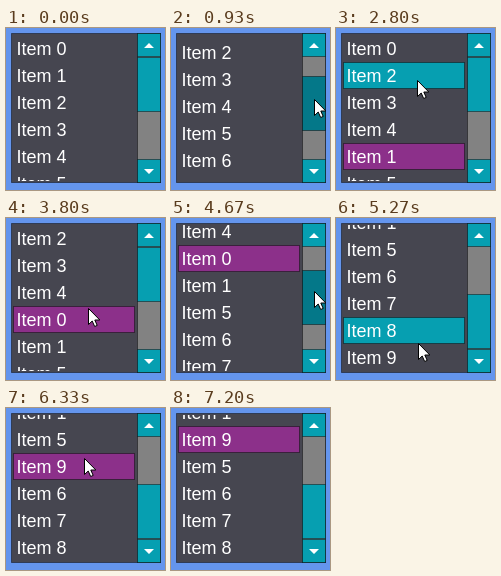
Animation of 159 by 162 pixels, one loop 8.07 s. Source, as an HTML page:

```html
<!DOCTYPE html>
<html lang="en">
<head>
<meta charset="utf-8">
<title>Reorderable list</title>
<style>
  html, body { margin: 0; width: 100%; height: 100%; overflow: hidden; background: #6495ed; }
  svg { display: block; width: 100%; height: 100%; }
  text { font: 18px "Liberation Sans", Arial, sans-serif; fill: #fff; }
  .box { stroke: #000; stroke-opacity: .45; }
</style>
</head>
<body>
<svg viewBox="0 0 159 162">
  <clipPath id="view"><rect x="7" y="7" width="122" height="146"/></clipPath>
  <rect class="box" x="5.5" y="5.5" width="149" height="149" fill="#464650"/>
  <g id="list" clip-path="url(#view)"></g>
  <rect class="box" x="131.5" y="5.5" width="23" height="149" fill="#828282"/>
  <rect id="thumb" class="box" x="131.5" y="29.5" width="23" height="54"/>
  <rect class="box" x="131.5" y="5.5" width="23" height="23" fill="#069fb1"/>
  <rect class="box" x="131.5" y="131.5" width="23" height="23" fill="#069fb1"/>
  <path d="M138 20h10l-5-5zM138 141h10l-5 5z" fill="#fff"/>
  <path id="cursor" d="M.5 .5V16.5L4.2 13 6.7 18.5 9.2 17.4 6.8 12H11.8Z" fill="#fff" stroke="#000"/>
</svg>
<script>
const LOOP = 8070, TICK = 200 / 3;
const ROW = 27, TOP = 7, VIEW = 146, COUNT = 10;
const MAX_SCROLL = COUNT * ROW - VIEW;
const THUMB_TOP = 29, THUMB_SIZE = 55, TRAVEL = 47;
const PRIMARY = '#069fb1', LIGHT = '#4ab4c1', DARK = '#047889', ACCENT = '#8c308a';

// Pointer path: time, x, y
const path = [
  [0, 172, 62], [70, 154, 58], [200, 143, 52], [330, 143, 52],
  [670, 143, 92], [800, 143, 92], [1070, 143, 48], [1330, 67, 46],
  [1400, 67, 46], [1870, 67, 93], [2270, 68, 129], [2800, 81, 52],
  [3130, 82, 18], [3200, 82, 18], [3800, 82, 90], [4000, 82, 90],
  [4400, 143, 50], [4470, 143, 50], [4930, 143, 102], [5000, 143, 102],
  [5270, 82, 125], [5530, 80, 135], [5670, 80, 134], [5870, 79, 106],
  [6330, 78, 50], [6530, 78, 31], [6870, 78, 31], [7200, 92, 168]
];
const grabs = [{ from: 270, to: 1070 }, { from: 4470, to: 4950 }];
const drags = [
  { from: 1470, to: 2330, item: 1 },
  { from: 3270, to: 3870, item: 0 },
  { from: 5600, to: 6600, item: 9 }
];

const $ = id => document.getElementById(id);
const clamp = (v, lo, hi) => Math.min(hi, Math.max(lo, v));
const during = (t, span) => t >= span.from && t < span.to;

function make(tag, attrs, parent) {
  const el = document.createElementNS('http://www.w3.org/2000/svg', tag);
  for (const k in attrs) el.setAttribute(k, attrs[k]);
  return parent.appendChild(el);
}

const rows = Array.from({ length: COUNT }, (_, i) => {
  const g = make('g', {}, $('list'));
  const bar = make('rect', { class: 'box', x: 7.5, y: .5, width: 121, height: ROW - 1 }, g);
  make('text', { x: 10.5, y: 20 }, g).textContent = 'Item ' + i;
  return { g, bar };
});

function pointer(t) {
  const i = path.findIndex(p => p[0] > t);
  if (i < 0) return path[path.length - 1].slice(1);
  const [a, ax, ay] = path[i - 1], [b, bx, by] = path[i];
  const k = (t - a) / (b - a);
  return [Math.round(ax + (bx - ax) * k), Math.round(ay + (by - ay) * k)];
}

function scrollAt(t) {
  let offset = 0;
  for (const g of grabs) {
    if (t < g.from) break;
    const dy = pointer(Math.min(t, g.to))[1] - pointer(g.from)[1];
    offset = clamp(offset + dy / TRAVEL * MAX_SCROLL, 0, MAX_SCROLL);
  }
  return Math.round(offset);
}

const rowAt = (y, scroll) => clamp(Math.floor((y - TOP + scroll) / ROW), 0, COUNT - 1);

function orderAt(t) {
  const order = rows.map((_, i) => i);
  for (const d of drags) {
    if (t < d.from) break;
    const end = Math.min(t, d.to - 60);
    order.splice(order.indexOf(d.item), 1);
    order.splice(rowAt(pointer(end)[1], scrollAt(end)), 0, d.item);
  }
  return order;
}

function draw(t) {
  const [x, y] = pointer(t);
  const scroll = scrollAt(t);
  const dragging = drags.some(d => during(t, d));
  const grabbing = grabs.some(g => during(t, g));
  const last = drags.filter(d => t >= d.from).pop();
  const inList = x >= 7 && x < 129 && y >= TOP && y < TOP + VIEW;
  const hover = inList && !dragging && !grabbing ? rowAt(y, scroll) : -1;

  orderAt(t).forEach((item, i) => {
    const { g, bar } = rows[item];
    const selected = last && last.item === item;
    g.setAttribute('transform', `translate(0 ${TOP + i * ROW - scroll})`);
    bar.setAttribute('fill', selected ? ACCENT : PRIMARY);
    bar.setAttribute('visibility', selected || i === hover ? 'visible' : 'hidden');
  });

  const top = THUMB_TOP + Math.round(scroll / MAX_SCROLL * TRAVEL);
  const overThumb = x >= 131 && x < 155 && y >= top && y < top + THUMB_SIZE;
  $('thumb').setAttribute('y', top + .5);
  $('thumb').setAttribute('fill', grabbing ? DARK : overThumb ? LIGHT : PRIMARY);
  $('cursor').setAttribute('transform', `translate(${x} ${y})`);
}

function frame() {
  const n = Math.floor((performance.now() % LOOP + 3.4) / TICK);
  draw(Math.round(n * TICK / 10) * 10);
  requestAnimationFrame(frame);
}
frame();
</script>
</body>
</html>
```
